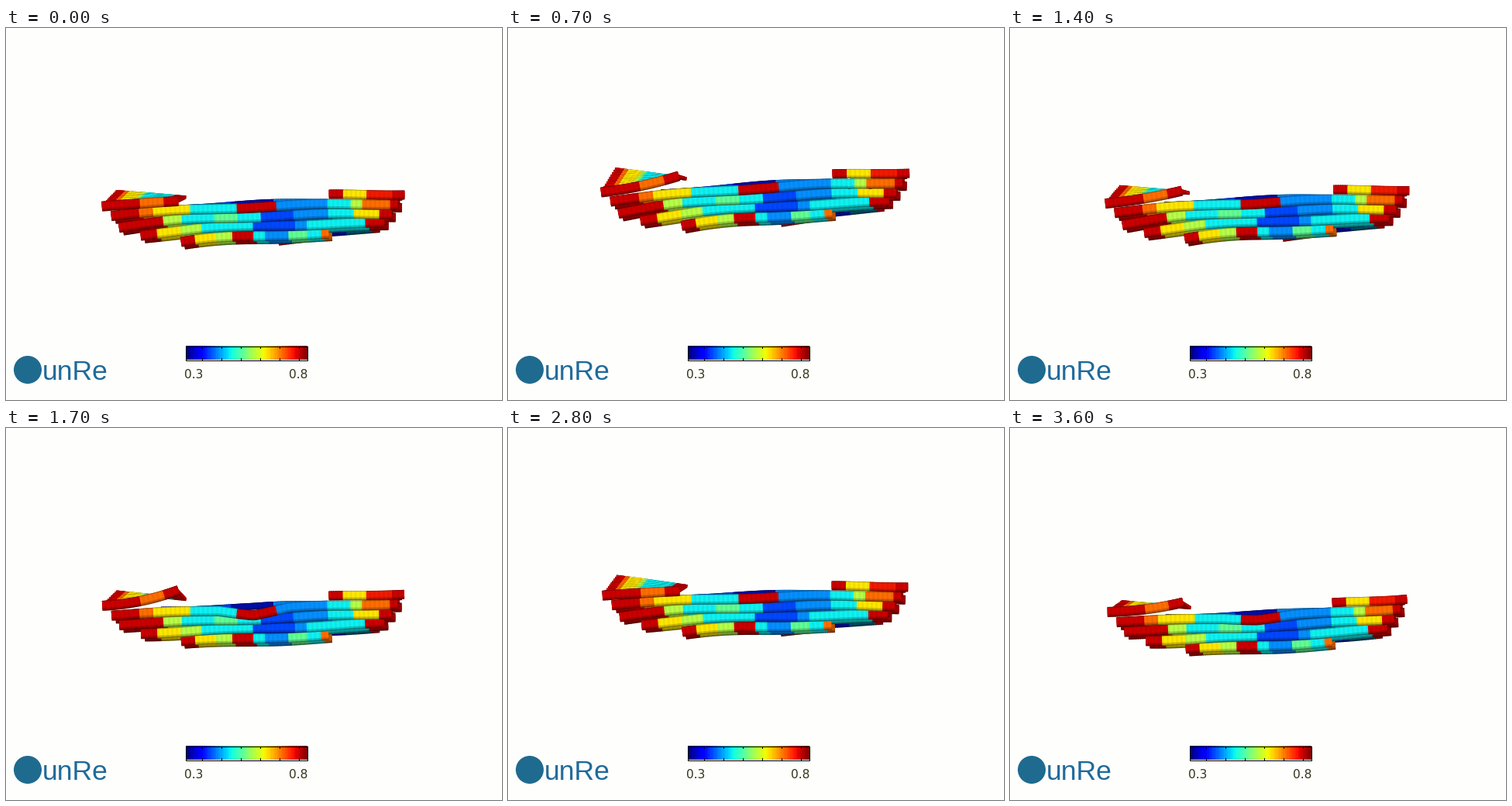
Recreate the animation shown at these times as a matplotlib script. Size 640x480 px, loop 3.7 s.

```python
import numpy as np
import matplotlib.pyplot as plt
from matplotlib.animation import FuncAnimation
from matplotlib.collections import LineCollection
from matplotlib.patches import Circle, Rectangle

W, H, DPI = 640, 480, 100
PT = 72 / DPI
LOOP, STEP = 3700, 100
PITCH = 12.5  # distance between strands
rng = np.random.default_rng(4)

COLORS = {
    "R": (.80, 0, 0), "r": (.95, .10, 0), "O": (1, .43, 0), "Y": (1, .91, 0),
    "L": (.72, 1, .28), "G": (.38, 1, .58), "C": (.06, .95, .95),
    "A": (.02, .56, 1), "B": (0, .28, 1), "N": (0, .06, .72), "T": (0, .38, .50),
}
# Offset, thickness and brightness of the stripes that shade a tube.
SHADES = ((0, 1, .5), (-.05, .87, .8), (-.1, .62, 1))

# time, height, tilt, bend, kink of the top strand, lift of the left flap
POSES = np.array([
    (0, 231, -8, 4, 0, 0),
    (700, 207, -13, 5, 0, -11),
    (1100, 215, -10, 10, -7, 0),
    (1700, 234, -8, 0, 7, -16),
    (2200, 232, -5, 3, -10, 0),
    (2800, 219, -6, 4, 0, 0),
    (3600, 244, -9, -3, 3, -10),
], float)


def pose_at(ms):
    """Pose values on a smooth closed curve through the key poses."""
    shift = np.eye(6)[0] * LOOP
    keys = np.vstack([POSES[-2:] - shift, POSES, POSES[:2] + shift])
    t, v = keys[:, 0], keys[:, 1:]
    i = np.searchsorted(t, ms, "right") - 1
    h = t[i + 1] - t[i]
    s = (ms - t[i]) / h
    m0, m1 = ((v[j + 1] - v[j - 1]) / (t[j + 1] - t[j - 1]) * h for j in (i, i + 1))
    return ((1 + 2 * s) * (1 - s) ** 2 * v[i] + s * (1 - s) ** 2 * m0
            + s * s * (3 - 2 * s) * v[i + 1] + s * s * (s - 1) * m1)


class Tube:
    """Shaded tube; bands such as 'R172 O203' give a colour and where it ends."""

    def __init__(self, x0, bands, level, width=13, dim=1.0, dx=0, dy=0, back=None):
        bands = [(float(b[1:]), b[0]) for b in bands.split()]
        ends = [b[0] for b in bands]
        n = int((ends[-1] - x0) / 3)
        self.u = np.linspace(x0, ends[-1], n + 1)
        self.level, self.width, self.back = level, width, back
        self.offset = dx, dy
        self.phase = rng.uniform(0, 2 * np.pi)
        mid = (self.u[1:] + self.u[:-1]) / 2
        base = np.array([COLORS[bands[k][1]] for k in np.searchsorted(ends, mid)]) * dim
        base[1::2] *= .95
        self.colors = np.vstack([base * s for _, _, s in SHADES])
        self.widths = np.repeat([w * width * PT for _, w, _ in SHADES], n)

    def path(self, pose):
        height, tilt, bend, kink, lift = pose
        u, level = self.u, self.level
        s = (u - 320) / 200
        v = (u - u[0]) / (u[-1] - u[0])
        x = 320 + (u - 320) * (1 + (231 - height) * .0008)
        y = height + PITCH * level + tilt * s + bend * s * s
        y += kink * max(0, 1 - 3 * abs(level)) * np.maximum(0, 1 - abs(u - 320) / 45)
        if level >= 1:  # lower strands droop at their left end
            y += .8 * max(bend, 0) * np.maximum(0, 1 - (u - u[0]) / 80) ** 1.5
        if self.back is None:
            y += 1.1 * np.sin(u / 30 + self.phase)
        else:  # layers of the flap recede up and to the right
            depth = 19 + (231 - height) * .45
            x = x + self.back * (18 - 8 * v)
            y += lift * v ** 2 * (1 - self.back) - self.back * depth * (1 - .75 * v)
        return np.column_stack([x, y]) + self.offset

    def segments(self, pose):
        p = self.path(pose)
        d = np.diff(p, axis=0)
        d *= .35 / np.hypot(*d.T)[:, None]
        seg = np.stack([p[:-1] - d, p[1:] + d], axis=1)
        return np.concatenate([seg + (0, o * self.width) for o, _, _ in SHADES])


STRANDS = [
    (226, "R243 Y270 L292 R320 C336 A366 G388 C406 O416", 3),
    (174, "R196 Y225 L253 C320 B345 B372 A388 C465 R488", 2),
    (146, "R203 L226 C270 G300 C328 B372 A415 C450 Y482 R497", 1),
    (136, "R172 O190 Y238 C297 R350 A415 C445 L460 O495 R505", 0),
]


def make_tubes():
    """All tubes from back to front."""
    tubes = [Tube(200, "N250 B290 N345 A415", -.3, 9, .9),
             Tube(352, "R378 O390 L403 R412", 3.4, 9, .85),
             Tube(415, "N440 T472 R482", 2.6, 9, .8),
             Tube(415, "N430 B450 T470 O480", 2.3, 9, .8)]
    for x0, bands, level in STRANDS:
        tubes.append(Tube(x0, bands, level, 12, .75, rng.uniform(2, 6), 4))
    for level in (1.67, 1.33, .67, .33, -.33, -.67):
        end = 505 - 8.7 * level
        tubes.append(Tube(end - 45, f"Y{end - 33} O{end - 18} R{end}", level, 10, .85))
    for back in np.linspace(1, .1, 10):
        tubes.append(Tube(124, "R135 O142 Y162 L168 C208 R222", -1, 4.5, back=back))
    tubes += [Tube(*strand) for strand in STRANDS]
    tubes.append(Tube(124, "R172 O203 R222", -1, back=0))
    tubes.append(Tube(417, "R434 Y466 r498 R514", -1, 12))
    return tubes


fig = plt.figure(figsize=(W / DPI, H / DPI), dpi=DPI, facecolor="#fefefc")
ax = fig.add_axes([0, 0, 1, 1])

# Colour scale
left, right, top, bottom = 231.5, 388.5, 410.5, 428.5
ax.imshow(np.linspace(0, 1, 64)[None], cmap="jet", aspect="auto",
          extent=(left, right, bottom, top), interpolation="nearest")
ax.add_patch(Rectangle((left, top), right - left, bottom - top,
                       fill=False, ec="black", lw=PT))
for tx in np.arange(252.5, 380, 25):
    for ty in (top, bottom - 2.5):
        ax.plot([tx, tx], [ty, ty + 2.5], color="black", lw=PT)
for tx, label in ((242.5, "0.3"), (377, "0.8")):
    ax.text(tx, 452, label, ha="center", va="baseline", color="#33331a",
            family="DejaVu Sans", size=15.5 * PT)

# Badge
ax.add_patch(Circle((28, 441), 18, fc="#1f6a8f", ec="none"))
ax.text(47, 454, "unRe", va="baseline", color="#1f6a9a",
        family="Liberation Sans", size=35.5 * PT)

tubes = make_tubes()
bundle = LineCollection([], colors=np.vstack([t.colors for t in tubes]),
                        linewidths=np.concatenate([t.widths for t in tubes]),
                        capstyle="butt", zorder=3)
ax.add_collection(bundle, autolim=False)
ax.set_xlim(0, W)
ax.set_ylim(H, 0)
ax.axis("off")


def update(i):
    pose = pose_at(i * STEP)
    bundle.set_segments(np.concatenate([t.segments(pose) for t in tubes]))
    return (bundle,)


anim = FuncAnimation(fig, update, frames=LOOP // STEP, interval=STEP,
                     repeat=True, repeat_delay=0, blit=False)
plt.show()
```
